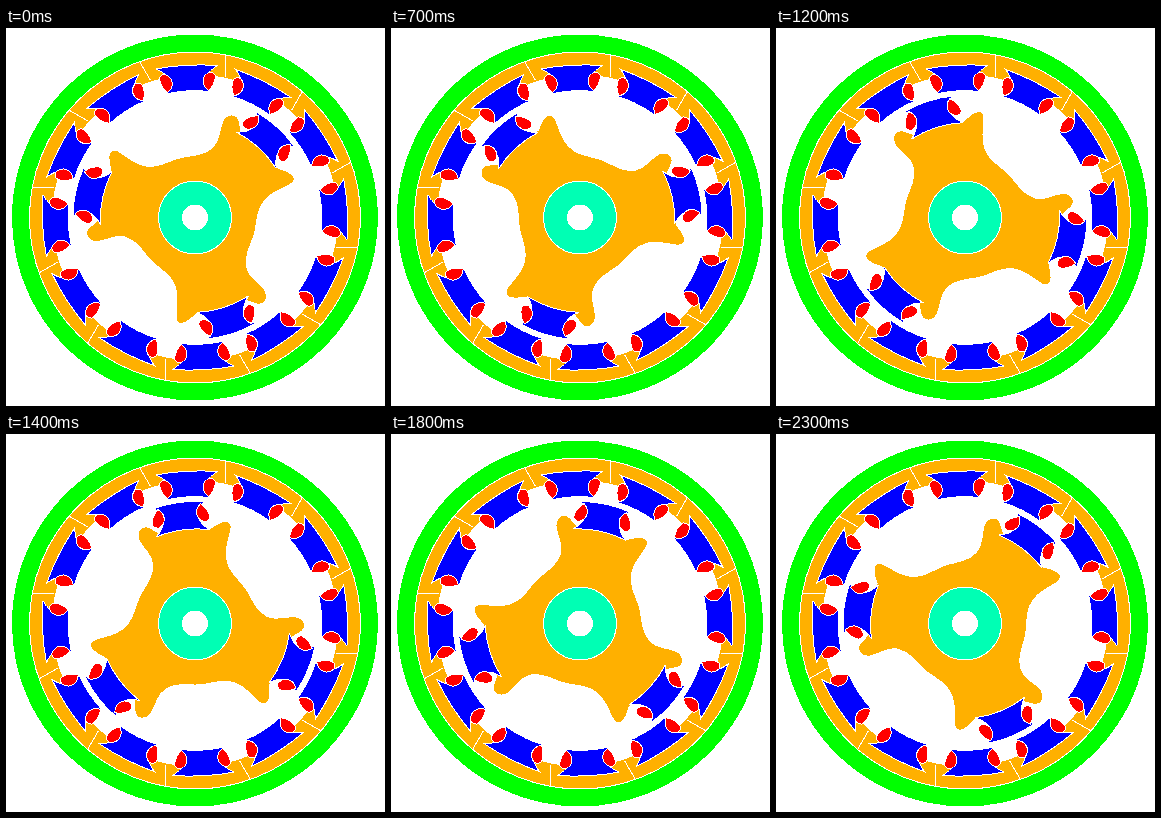
These frames come from a looping animation (379x378 px, 2.4 s). An HTML page:

```html
<!DOCTYPE html>
<html lang="en">
<head>
<meta charset="utf-8">
<title>Motor</title>
<style>
  html, body { margin: 0; width: 100%; height: 100%; overflow: hidden; background: #fff; }
  svg { display: block; width: 379px; height: 378px; }
</style>
</head>
<body>
<svg viewBox="0 0 379 378" shape-rendering="crispEdges">
  <defs>
    <g id="pole" stroke="#fff">
      <path fill="#00f" d="M-31,-150.5 Q0,-154.5 31,-150.5 C20,-145 12,-136 21.5,-125 A127,127 0 0 0 -21.5,-125 C-12,-136 -20,-145 -31,-150.5Z"/>
      <path id="leaf" fill="#f00" d="M20.5,-126 C13,-132 14,-141 22,-144.5 Q26,-145 28,-141 C28,-136 25,-130 20.5,-126Z"/>
      <use href="#leaf" transform="scale(-1 1)"/>
    </g>
    <path id="arm" fill="#ffb000" d="M0,0 L-50.6,-34.1 C-45,-42.4 -37,-50 -36.5,-62 C-36,-72 -45,-80 -48,-88 C-51,-97 -43,-104 -36,-98 L-27,-92 Q0,-98 24,-93 L32,-97 C42,-101 46,-97 43,-89 C40,-80 36,-72 36.5,-62 C37,-50 45,-42.4 50.6,-34.1Z"/>
    <g id="shoe" stroke="#fff" transform="rotate(-2.7)">
      <path fill="#00f" d="M-27,-91 Q0,-98 27,-91 C16,-100 14,-110 25,-119.4 A122,122 0 0 0 -25,-119.4 C-14,-110 -16,-100 -27,-91Z"/>
      <g transform="matrix(1 0 0 -1 0 -244)">
        <use href="#leaf" x="1"/>
        <use href="#leaf" x="1" transform="scale(-1 1)"/>
      </g>
    </g>
  </defs>
  <g transform="translate(189 189.5)">
    <circle r="183" fill="#0f0"/>
    <circle r="165.5" fill="#ffb000" stroke="#fff"/>
    <circle r="143" fill="#fff"/>
    <g id="stator"></g>
    <g id="rotor"><circle r="61" fill="#ffb000"/></g>
    <circle r="36.5" fill="#00ffb4" stroke="#fff"/>
    <circle r="13" fill="#fff"/>
  </g>
</svg>
<script>
  const STEP_MS = 100, STEPS = 24, STEP_DEG = 5, START_DEG = 45;
  const stator = document.getElementById('stator');
  const rotor = document.getElementById('rotor');

  function add(parent, tag, attrs) {
    const el = document.createElementNS('http://www.w3.org/2000/svg', tag);
    for (const key in attrs) el.setAttribute(key, attrs[key]);
    parent.append(el);
  }

  for (let a = 0; a < 360; a += 30) {
    add(stator, 'path', { d: 'M30,-141V-163', stroke: '#fff', transform: `rotate(${a})` });
    add(stator, 'use', { href: '#pole', transform: `rotate(${a - 3.1})` });
  }
  for (const part of ['#arm', '#shoe'])
    for (const a of [0, 120, 240])
      add(rotor, 'use', { href: part, transform: `rotate(${a})` });

  const start = performance.now();
  function draw(now) {
    const step = Math.floor(Math.max(0, now - start) / STEP_MS) % STEPS;
    rotor.setAttribute('transform', `rotate(${START_DEG + step * STEP_DEG})`);
    requestAnimationFrame(draw);
  }
  draw(start);
</script>
</body>
</html>
```
